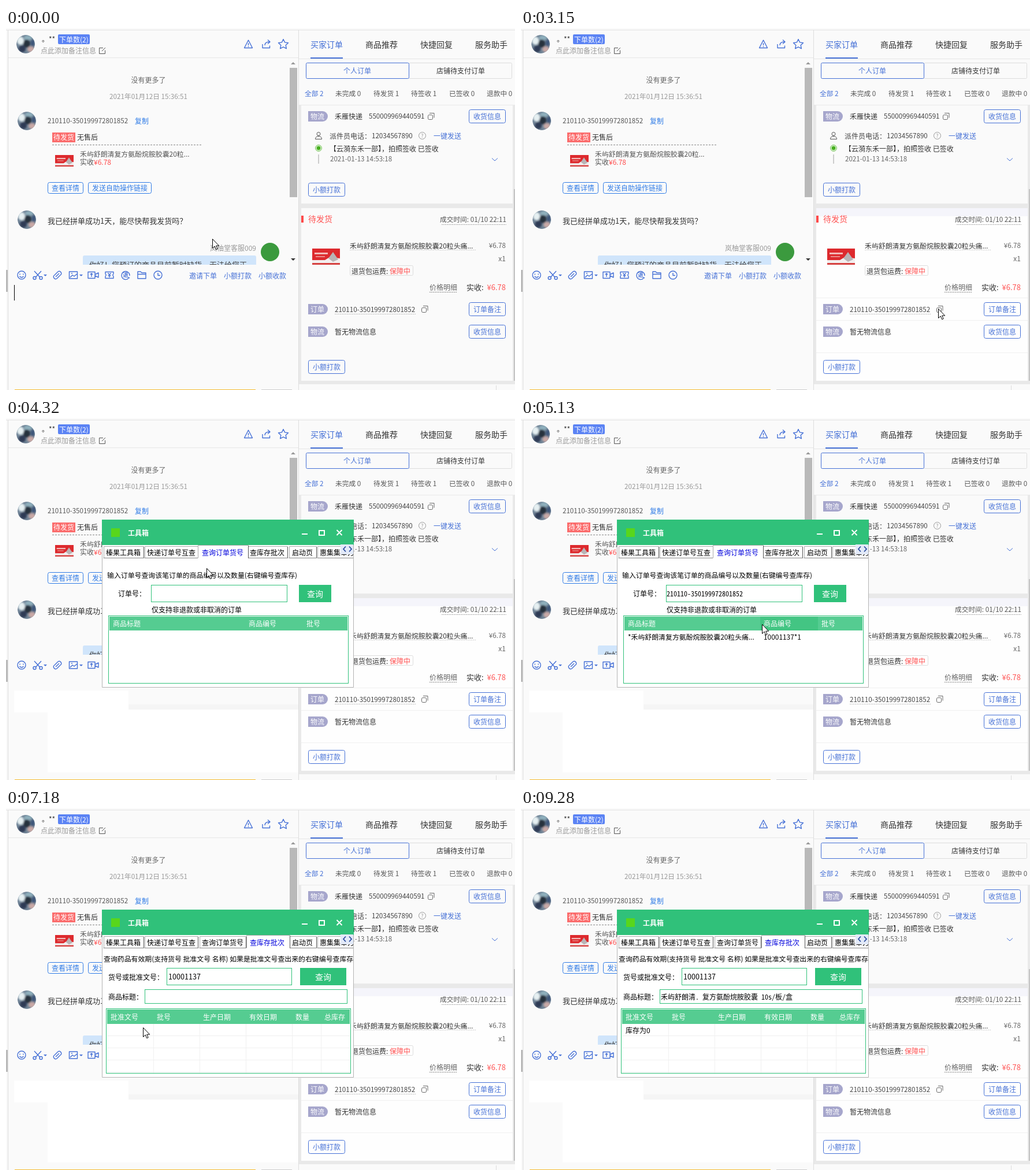
Recreate the animation shown at these times as an HTML page. Size 881 px wide and 627 px high, loop 9.38 s.

```html
<!DOCTYPE html>
<html lang="zh-CN">
<head>
<meta charset="utf-8">
<title>订单查询</title>
<style>
html, body { margin: 0; width: 100%; height: 100%; overflow: hidden; background: #fafafa; }
svg { display: block; width: 881px; height: 627px; }
text { font-family: "Noto Sans CJK SC", "Noto Sans CJK", sans-serif; white-space: pre; }
.mono { font-family: "Noto Sans Mono CJK SC", "Noto Sans CJK SC", monospace; }
</style>
</head>
<body>
<svg id="stage" viewBox="0 0 881 627" xmlns="http://www.w3.org/2000/svg"></svg>
<script>
const BLUE = '#4570d6', LINK = '#2f7be6', GREEN = '#30c17a', RED = '#ff5454', GRAY = '#999', DARK = '#333';
const LOOP = 9380, STEP = 134;
const PRODUCT = '禾屿舒朗清复方氨酚烷胺胶囊20粒', ORDER = '210110-350199972801852';
const QUESTION = '我已经拼单成功1天，能尽快帮我发货吗？';

// y is the vertical middle of the line; baselines sit on whole pixels
const text = (x, y, s, fill = DARK, size = 12, more = '') =>
  `<text x="${x}" y="${Math.round(y + size * .38)}" font-size="${size}" fill="${fill}" ${more}>${s}</text>`;
const mid = 'text-anchor="middle"', end = 'text-anchor="end"';
const digits = (x, y, s, fill = '#555') => text(x, y, s, fill, 11.6);
const rect = (x, y, w, h, fill, more = '') =>
  `<rect x="${x}" y="${y}" width="${w}" height="${h}" fill="${fill}" ${more}/>`;
const box = (x, y, w, h, stroke, r = 0, fill = 'none') =>
  rect(x + .5, y + .5, w - 1, h - 1, fill, `stroke="${stroke}" rx="${r}"`);
const path = (d, stroke, more = '') => `<path d="${d}" fill="none" stroke="${stroke}" ${more}/>`;
const line = (x1, y1, x2, y2, stroke, dash = '') =>
  path(`M${x1} ${y1}L${x2} ${y2}`, stroke, dash && `stroke-dasharray="${dash}"`);
const dot = (x, y, r, fill, more = '') => `<circle cx="${x}" cy="${y}" r="${r}" fill="${fill}" ${more}/>`;
const group = (id, content, more = '') => `<g id="${id}" ${more}>${content}</g>`;
const button = (x, y, w, h, s, color = BLUE) =>
  box(x, y, w, h, color, 3) + text(x + w / 2, y + h / 2, s, color, 12, mid);
const badge = (y, s) =>
  `<path d="M523 ${y}h25a9 9 0 0 1 0 18h-25z" fill="#a6a6cc"/>` + text(527, y + 9, s, '#fff', 12, 'font-weight="500"');
const copyIcon = (x, y) => box(x - 6, y - 3, 9, 9, '#666', 2) + path(`M${x - 3} ${y - 5.5}h8v8`, '#666');

// blurred photographs reduced to a few flat shapes
const avatar = (x, y) => {
  const blob = (dx, dy, rx, ry, fill) => `<ellipse cx="${dx}" cy="${dy}" rx="${rx}" ry="${ry}" fill="${fill}"/>`;
  return `<g transform="translate(${x} ${y})" clip-path="url(#round)">` + dot(0, 0, 16, '#6f8396') +
    '<g filter="url(#soft)">' + blob(-9, -6, 6, 7, '#e6f0f2') + blob(4, -11, 7, 4, '#8fb0bd') + blob(2, -1, 6, 7, '#25303e') +
    blob(-6, 8, 6, 6, '#2d3a55') + blob(9, 9, 6, 5, '#c9a9a6') + blob(12, -2, 3, 6, '#3a5278') + '</g></g>';
};
const photo = (x, y, w, h) => `<g transform="translate(${x} ${y}) scale(${w / 48} ${h / 28})">` +
  rect(0, 0, 48, 28, '#dd2a2e') + '<path d="M0 20h22l8-5 18 2v8H0z" fill="#f2eeee"/>' +
  '<path d="M28 17l8-11 9 13-9 4z" fill="#b9b4b6"/>' + rect(4, 7, 23, 3, '#f3bab8') + rect(6, 13, 16, 2, '#e98a88') +
  rect(0, 25, 48, 3, '#d5403f') + '</g>';

function chatPanel() {
  const icon = (d, more = '') => path(d, BLUE, `stroke-width="1.4" stroke-linejoin="round" ${more}`);
  const header = avatar(34, 28) + text(62, 19, '。**') + rect(90, 11, 55, 17, '#5b83f4', 'rx="2"') +
    text(92, 20, '下单数(2)', '#fff') + text(60, 39, '点此添加备注信息', GRAY) +
    path('M168 34.5h-6.500v10h10v-6M166 40l6-6', '#555') +
    icon('M419.500 21l7 13.500h-14zM419.500 26v4M419.500 31.500v1.500') +
    icon('M444 28v6.500h12.500v-4M448 30q0-6 8-6M453 20.500l4 3.500-4 3.500') +
    icon('M480 19.500l2.600 5.400 5.900.8-4.300 4.100 1.100 5.900-5.300-2.800-5.300 2.800 1.100-5.900-4.300-4.100 5.900-.8z');
  const messages = text(246.5, 90, '没有更多了', '#666', 12, mid) +
    text(246.5, 119, '2021年01月12日 15:36:51', GRAY, 11.7, mid) +
    avatar(36, 161) + digits(72, 161, ORDER) + text(223, 161, '复制', LINK) +
    rect(80, 181, 40, 17, '#fb6c6c') + text(82, 189, '待发货', '#fff') + text(123, 189, '无售后') +
    line(80, 202.5, 340, 202.5, '#888', '3 2') + photo(85, 220, 32, 20) +
    text(128, 218, PRODUCT + '...', '#555', 11.9) + text(128, 232, '实收<tspan fill="#ff4a4a">¥6.78</tspan>', '#555') +
    button(72, 267, 62, 20, '查看详情', LINK) + button(142, 267, 110, 20, '发送自助操作链接', LINK) +
    avatar(36, 332) + text(72, 334, QUESTION, DARK, 13) +
    group('selection', rect(72, 326, 240, 16, '#3093fa') + text(72, 334, QUESTION, '#fff', 13), 'clip-path="url(#selected)"') +
    text(433, 381, '岚柚堂客服009', GRAY, 12, end) + dot(457, 388, 16, '#3b9a3e') +
    rect(133, 394, 300, 30, '#d0e5fb', 'rx="3"') + text(144, 410, '你好！您预订的商品目前暂时缺货，无法给您正', '#444', 13);
  const scrollbar = '<path d="M493 63l4-4 4 4z" fill="#999"/><path d="M493 399h8l-4 4z" fill="#333"/>' +
    rect(491, 69, 13, 224, '#b9b9b9');
  const toolbar = dot(27, 428, 7, 'none', `stroke="${BLUE}" stroke-width="1.4"`) +
    icon('M24 425.500v2M30 425.500v2M23.500 430q3.500 4 7 0') +
    icon('M49 421l10 11M61 421l-10 11') + dot(49.5, 433, 2.5, 'none', `stroke="${BLUE}" stroke-width="1.4"`) +
    dot(60.5, 433, 2.5, 'none', `stroke="${BLUE}" stroke-width="1.4"`) +
    icon('M87 425l3-3q3-2 5 1t-1 5l-3 3M91 431l-3 3q-3 2-5-1t1-5l3-3M86 431l6-6') +
    icon('M109.500 422h14v12h-14zM111 432l4-4 3 2 5-4M113 425h2') +
    icon('M142 422.500h12v11h-12zM154 427l6-3v8l-6-3M148 431v-6M146 427l2-2 2 2') +
    icon('M172 422.500h14v3.500q-2.500 2 0 4v3.500h-14v-3.500q2.500-2 0-4zM176.500 424.500l2.500 3 2.500-3M179 427.500v4.500M176.500 429h5') +
    icon('M212 433.500a7 7 0 1 1 2-4.500M214 433l-3-1') + text(207, 428, '退', BLUE, 9, mid + ' font-weight="bold"') +
    icon('M228 422h5l2 2h7v10h-14zM228 426.500h14') +
    dot(263, 428, 7, 'none', `stroke="${BLUE}" stroke-width="1.4"`) + icon('M263 424v4.500h4') +
    [65, 127].map(x => `<path d="M${x} 427h6l-3 3z" fill="${BLUE}"/>`).join('') +
    ['邀请下单', '小额打款', '小额收款'].map((s, i) => text(317 + 60 * i, 429, s, BLUE)).join('');
  return rect(0, 419, 3, 38, '#bbb') + line(3.5, 3, 3.5, 627, '#ddd') + line(0, 3.5, 881, 3.5, '#e2e2e2') +
    line(4, 51.5, 506, 51.5, '#e6e6e6') + header + `<g clip-path="url(#chat)">${messages}</g>` + scrollbar + toolbar +
    group('repaint', rect(14, 472, 198, 38, '#fff') + rect(72, 505, 434, 109, '#fff') + rect(212, 496, 294, 9, '#f5f5f5')) +
    rect(15, 626, 417, 1, '#f4b92e') + rect(442, 626, 53, 1, '#ccc') +
    group('caret', rect(14, 445, 1, 27, '#000'));
}

function orderPanel() {
  const tabs = ['买家订单', '商品推荐', '快捷回复', '服务助手']
    .map((s, i) => text(527 + 95 * i, 29, s, i ? DARK : BLUE, 14)).join('');
  const filters = ['全部 2', '未完成 0', '待发货 1', '待签收 1', '已签收 0', '退款中 0'];
  const filterX = [517, 570, 636, 701, 767, 832];
  const parcel = badge(144, '物流') + text(569, 153, '禾雁快递') + digits(628, 153, '550009969440591', '#444') +
    copyIcon(736, 153) + button(801, 141, 64, 24, '收货信息') +
    dot(541, 183.5, 3, 'none', 'stroke="#555"') + path('M535.500 192.500q0-5 5.500-5t5.500 5z', '#555') +
    text(560, 187, '派件员电话：', '#444') + digits(633, 187, '12034567890', '#444') +
    dot(720.5, 186.5, 6, 'none', 'stroke="#999"') + text(720.5, 187, '?', GRAY, 9, mid) + text(740, 187, '一键发送', BLUE) +
    dot(541, 208, 5.5, '#c9ebbd', 'stroke="#86ca6c"') + dot(541, 208, 3.2, '#46ae1e') + rect(540, 219, 2, 16, '#ccc') +
    text(560, 209, '【云漪东禾一部】，拍照签收 已签收') + digits(561, 227, '2021-01-13 14:53:18', '#666') +
    path('M841 225.500l5 4.500 5-4.500', BLUE) + button(523, 268, 64, 24, '小额打款');
  const pending = rect(511, 325, 4, 12, '#ff4a4a') + text(523, 331, '待发货', '#ff5353', 14) +
    text(866, 332, '成交时间: <tspan font-weight="500">01/10 22:11</tspan>', '#555', 11.7, end) +
    line(754, 340.5, 866, 340.5, '#aaa', '2 1') +
    photo(530, 382, 48, 28) + text(595, 377, PRODUCT + '头痛...', DARK, 11.9) + line(595, 384.5, 814, 384.5, '#ccc', '2 1') +
    text(865, 377, '¥6.78', '#666', 11.7, end) + text(865, 399, 'x1', '#666', 12, end) +
    box(595, 411, 110, 18, '#ddd', 2) + text(598, 421, '退货包运费:') + text(664, 421, '保障中', RED) +
    text(733, 449, '价格明细', '#666') + line(733, 457.5, 781, 457.5, '#888', '2 1') +
    text(797, 449, '实收:', DARK, 13) + text(865, 449, '¥6.78', RED, 13, end) +
    badge(478, '订单') + digits(569, 488, ORDER, '#444') + line(569, 495.5, 710, 495.5, '#bbb', '2 1') + copyIcon(725, 487) +
    button(801, 475, 64, 24, '订单备注') + badge(517, '物流') + text(569, 526, '暂无物流信息') +
    button(801, 514, 64, 24, '收货信息') + button(523, 575, 64, 24, '小额打款');
  return line(506.5, 3, 506.5, 627, '#ddd') + tabs + rect(527, 51, 56, 2, BLUE) + line(507, 53.5, 881, 53.5, '#e6e6e6') +
    box(697, 60, 179, 28, '#ddd', 2) + box(519, 60, 179, 28, BLUE, 2) +
    text(608, 74, '个人订单', BLUE, 12, mid) + text(787, 74, '店铺待支付订单', DARK, 12, mid) +
    filters.map((s, i) => text(filterX[i], 114, s, i ? '#555' : BLUE, 11.7)).join('') +
    rect(507, 133, 374, 484, '#e9e9e9') + rect(511, 134, 366, 170, '#fafafa') + rect(511, 312, 366, 299, '#fafafa') +
    group('hover', rect(511, 312, 366, 299, '#fefefe') + rect(511, 312, 366, 14, '#f5f5fb') +
      [467.5, 506.5, 562.5].map(y => line(511, y, 877, y, '#f0f0f0')).join('')) +
    rect(879, 279, 2, 332, '#c4c4c4') + line(848.5, 619, 848.5, 627, '#ddd') + parcel + pending;
}

function grid(x, right, columns, rows) {
  return columns.map(c => line(c + .5, rows[0] - 20, c + .5, 459, '#f0f0f0')).join('') +
    rows.map(y => line(x, y + .5, right, y + .5, '#f0f0f0')).join('');
}
const heads = (names, xs, y) => names.map((s, i) => text(xs[i], y, s, '#fff')).join('');
const greenButton = (x, y, w) => rect(x, y, w, 30, GREEN) + text(x + w / 2, y + 15.5, '查询', '#fff', 14, mid);

function tabStrip(active) {
  const names = ['榛果工具箱', '快递订单号互查', '查询订单货号', '查库存批次', '启动页', '惠集集审方'];
  const textX = [173, 244, 339, 422, 495, 543], left = [169, 240, 335, 419, 490, 539], right = [239, 333, 416, 488, 538, 610];
  const tab = i => {
    const on = i === active, x = left[i] - 3 * on, r = right[i] + (on ? 4 : 0), top = on ? 220 : 222;
    return rect(x, top, r - x, 243 - top, '#fff') + path(`M${x + .5} 242.500V${top + .5}H${r - .5}`, '#aaa') +
      line(r - .5, top + 1, r - .5, 243, '#555') + (on ? '' : line(x, 242.5, r, 242.5, '#888')) +
      text(textX[i], 233, names[i], on ? '#0000dc' : '#000', 12, i === 2 && !on ? 'class="order-tab"' : '');
  };
  return line(168, 242.5, 601, 242.5, '#ddd') + [0, 1, 2, 3, 4, 5].filter(i => i !== active).map(tab).join('') + tab(active) +
    rect(579, 219, 22, 17, '#e3eaf8') + path('M588 222.500l-4 4.500 4 4.500M594 222.500l4 4.500-4 4.500', '#2d4fa0', 'stroke-width="1.8"');
}

function orderPage() {
  return tabStrip(2) + text(175, 272, '输入订单号查询该笔订单的商品编号以及数量(右键编号查库存)', '#000', 11.9) +
    text(194, 304, '订单号：', '#000') + box(251, 289, 236, 30, GREEN) + greenButton(507, 289, 56) +
    group('pasted', text(252, 304, ORDER, '#000', 12, 'class="mono"')) +
    text(252, 332, '仅支持非退款或非取消的订单', '#000') +
    box(177, 342, 416, 118, GREEN) + rect(179, 344, 412, 24, '#55cc91') +
    group('headHover', rect(414, 344, 100, 24, '#43c583')) +
    heads(['商品标题', '商品编号', '批号'], [185, 420, 520], 356) +
    group('rowHover', rect(179, 368, 412, 21, '#f0f0f0')) +
    group('orderGrid', grid(179, 591, [414, 514], [388, 409, 430, 451])) +
    group('orderResult', text(185, 379, '*' + PRODUCT + '头痛...', '#000', 11.9) + text(420, 379, '10001137*1', '#000', 11.9));
}

function stockPage() {
  return tabStrip(3) +
    text(169, 261, '查询药品有效期(支持货号 批准文号 名称) 如果是批准文号查出来的右键编号查库存', '#000', 11.9) +
    text(177, 293, '货号或批准文号：', '#000') + box(278, 277, 217, 30, GREEN) + text(281, 292, '10001137', '#000', 12.6) +
    greenButton(509, 277, 80) + text(177, 327, '商品标题：', '#000') + box(240, 314, 351, 25, GREEN) +
    box(173, 347, 424, 113, GREEN) + rect(175, 349, 420, 25, '#55cc91') +
    heads(['批准文号', '批号', '生产日期', '有效日期', '数量', '总库存'], [181, 261, 341, 421, 501, 551], 362) +
    grid(175, 595, [255, 335, 415, 495, 545], [394, 415, 436, 457]) +
    group('stockResult', text(242, 327, '禾屿舒朗清. 复方氨酚烷胺胶囊 10s/板/盒', '#000', 12, 'class="mono"') + text(181, 385, '库存为0', '#000')) +
    group('focus', path('M178.500 394V374.500H594.500V394', '#000', 'stroke-dasharray="1 1"'));
}

function toolWindow() {
  return rect(167, 177, 435, 290, '#fff') + path('M166.500 177v289.500h435v-289', '#b4b4b4') + rect(166, 176, 436, 44, GREEN) +
    rect(182, 191, 15, 15, '#58d61c') + text(211, 199, '工具箱', '#fff', 12, 'font-weight="bold"') +
    path('M512 201h10M542 195h9v8h-9zM572.500 194l9 9M581.500 194l-9 9', '#fff', 'stroke-width="2"') +
    `<g clip-path="url(#frame)">${group('orderPage', orderPage())}${group('stockPage', stockPage())}</g>`;
}

document.getElementById('stage').innerHTML = `<defs>
  <filter id="soft"><feGaussianBlur stdDeviation="1.5"/></filter>
  <clipPath id="round"><circle r="16"/></clipPath>
  <clipPath id="chat"><rect x="4" y="52" width="486" height="358"/></clipPath>
  <clipPath id="frame"><rect x="168" y="218" width="433" height="248"/></clipPath>
  <clipPath id="selected"><rect id="selectedArea" x="72" y="325" width="0" height="18"/></clipPath></defs>` +
  rect(0, 0, 881, 627, '#fafafa') + chatPanel() + orderPanel() + group('toolWindow', toolWindow()) +
  group('arrow', '<path d="M.5.5v16l3.700-3.500 2.500 5.700 2.500-1.100-2.500-5.400h5z" fill="#fff" stroke="#000"/>') +
  group('beam', path('M-3-7.500h2.500l.5.500.5-.5h2.500M0-7v14M-3 7.500h2.500l.5-.5.5.5h2.500', '#000'));

const $ = id => document.getElementById(id);
const show = (id, on) => $(id).setAttribute('visibility', on ? 'inherit' : 'hidden');
const within = (t, a, b) => t >= a && t < b;

// time, x, y of the pointer
const route = [[134, 357, 365], [1000, 73, 331], [1206, 73, 331], [1608, 302, 331], [1950, 302, 331], [2700, 722, 486],
  [3150, 722, 486], [4000, 361, 237], [4200, 361, 237], [4420, 320, 303], [4560, 320, 303], [4750, 535, 303],
  [4850, 535, 303], [5090, 417, 357], [5300, 425, 361], [5800, 436, 374], [6430, 237, 380], [7300, 237, 380],
  [8040, 383, 408], [8500, 383, 408], [9100, 840, 520]];

function pointerAt(t) {
  const next = route.findIndex(p => p[0] > t);
  if (next === 0) return route[0].slice(1);
  if (next < 0) return route[route.length - 1].slice(1);
  const [a, b] = [route[next - 1], route[next]];
  const u = (t - a[0]) / (b[0] - a[0]), k = u * u * (3 - 2 * u);
  return [a[1] + (b[1] - a[1]) * k, a[2] + (b[2] - a[2]) * k];
}

function render(now) {
  const time = now % LOOP, t = Math.floor(time / STEP) * STEP;
  const [x, y] = pointerAt(t);
  const open = t >= 3400, onOrder = within(t, 4150, 6830), beam = within(t, 930, 2010);
  show('caret', (time + 400) % 990 < 495);
  show('selection', within(t, 1200, 2140));
  $('selectedArea').setAttribute('width', Math.max(0, x - 73));
  show('hover', t >= 2400);
  show('repaint', open);
  show('toolWindow', open);
  show('orderPage', open && onOrder);
  show('stockPage', open && !onOrder);
  document.querySelector('.order-tab').setAttribute('fill', within(t, 3900, 4150) ? '#f00' : '#000');
  const inOrder = open && onOrder;
  show('pasted', inOrder && t >= 4550);
  show('orderResult', inOrder && t >= 4940);
  show('orderGrid', inOrder && t >= 5200);
  show('headHover', inOrder && within(y, 344, 368) && within(x, 414, 514));
  show('rowHover', inOrder && t >= 5000 && within(y, 368, 389));
  show('stockResult', open && !onOrder && (t < 4150 || t >= 7450));
  show('focus', within(t, 7900, 8700));
  show('arrow', !beam && t < 9100);
  show('beam', beam);
  for (const id of ['arrow', 'beam'])
    $(id).setAttribute('transform', `translate(${Math.round(x)} ${Math.round(y)})`);
}

const start = performance.now();
function tick() {
  render(performance.now() - start);
  requestAnimationFrame(tick);
}
render(0);
requestAnimationFrame(tick);
</script>
</body>
</html>
```
